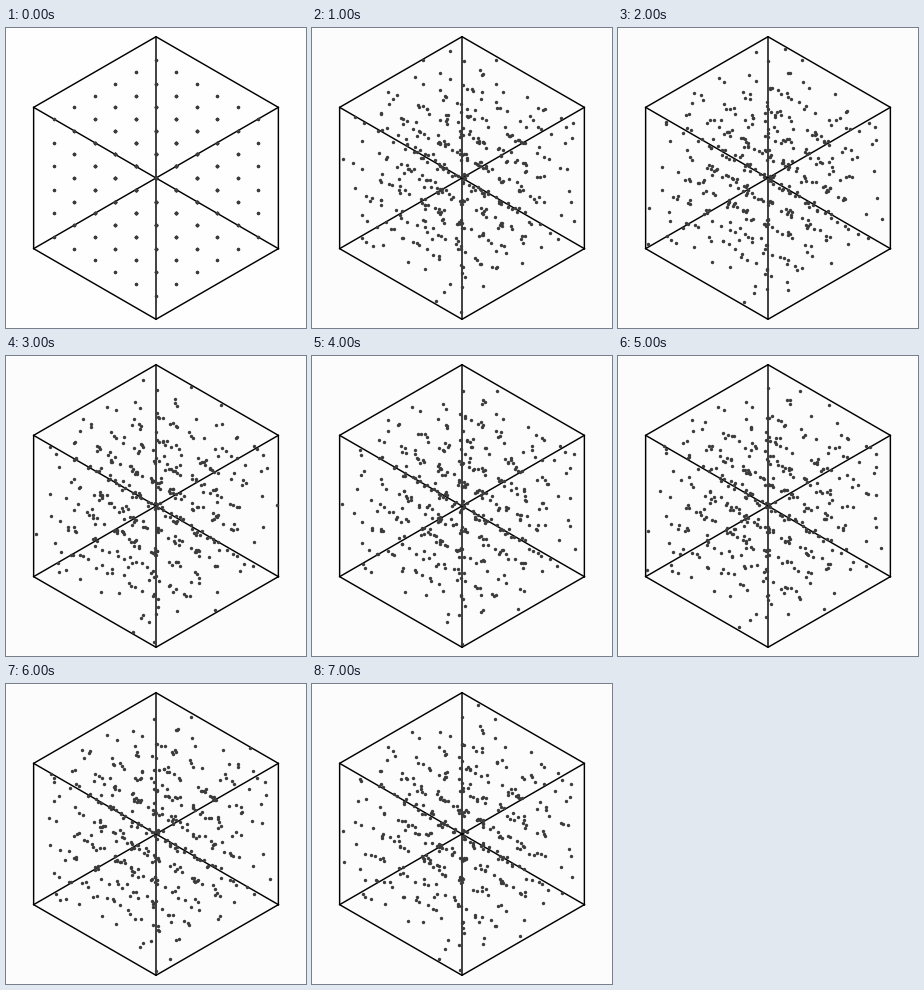
These frames come from a looping animation (300x300 px, 8 s). A matplotlib script:

```python
import itertools
import numpy as np
import matplotlib.pyplot as plt
from matplotlib.animation import FuncAnimation

SIZE, DPI = 300, 100
PX = 72 / DPI
FRAMES, INTERVAL = 8, 1000
CENTER = np.array([150.0, 150.0])
EDGE, CELLS = 141.3, 6
# Screen directions of the cube axes, seen along the body diagonal
C30, S30 = np.cos(np.pi / 6), 0.5
AXES = np.array([[-C30, S30], [C30, S30], [0, -1]])
# Spread per axis in cells: lasting slip along the rows, and heat
SLIP = [0.09, 0.24, 0.09]
HEAT = 0.05


def project(atoms):
    return CENTER + EDGE / CELLS * atoms @ AXES


def displace(shape, spread, seed):
    return np.random.default_rng(seed).normal(0, 1, shape) * spread


# Body-centred cubic crystal: one corner and one middle atom per cell
cells = np.array(list(itertools.product(range(CELLS), repeat=3)), float)
crystal = np.vstack([cells, cells + 0.5])
settled = crystal + displace(crystal.shape, SLIP, 4)

fig = plt.figure(figsize=(SIZE / DPI, SIZE / DPI), dpi=DPI)
ax = fig.add_axes([0, 0, 1, 1])
ax.set_xlim(0, SIZE)
ax.set_ylim(SIZE, 0)
ax.axis("off")

# Outline of the box, then its three diagonals
angles = np.radians(np.arange(30, 391, 60))
corners = CENTER + EDGE * np.column_stack([np.cos(angles), np.sin(angles)])
line = dict(color="black", lw=1.45 * PX, solid_joinstyle="round", snap=False)
ax.plot(*corners.T, **line)
for a, b in zip(corners[:3], corners[3:6]):
    ax.plot(*zip(a, b), **line)

dots, = ax.plot([], [], "o", ms=3.4 * PX, mfc="#3c3c3c", mec="none",
                zorder=3)


def draw(i):
    if i == 0:
        atoms, paper = crystal, "#fefefe"
    else:
        # Atoms that leave the box come back through the opposite face
        atoms = (settled + displace(crystal.shape, HEAT, 100 + i)) % CELLS
        paper = "#fcfcfc"
    fig.set_facecolor(paper)
    dots.set_data(*project(atoms).T)
    return dots,


anim = FuncAnimation(fig, draw, frames=FRAMES, interval=INTERVAL,
                     repeat=True, repeat_delay=0, blit=False)
plt.show()
```
